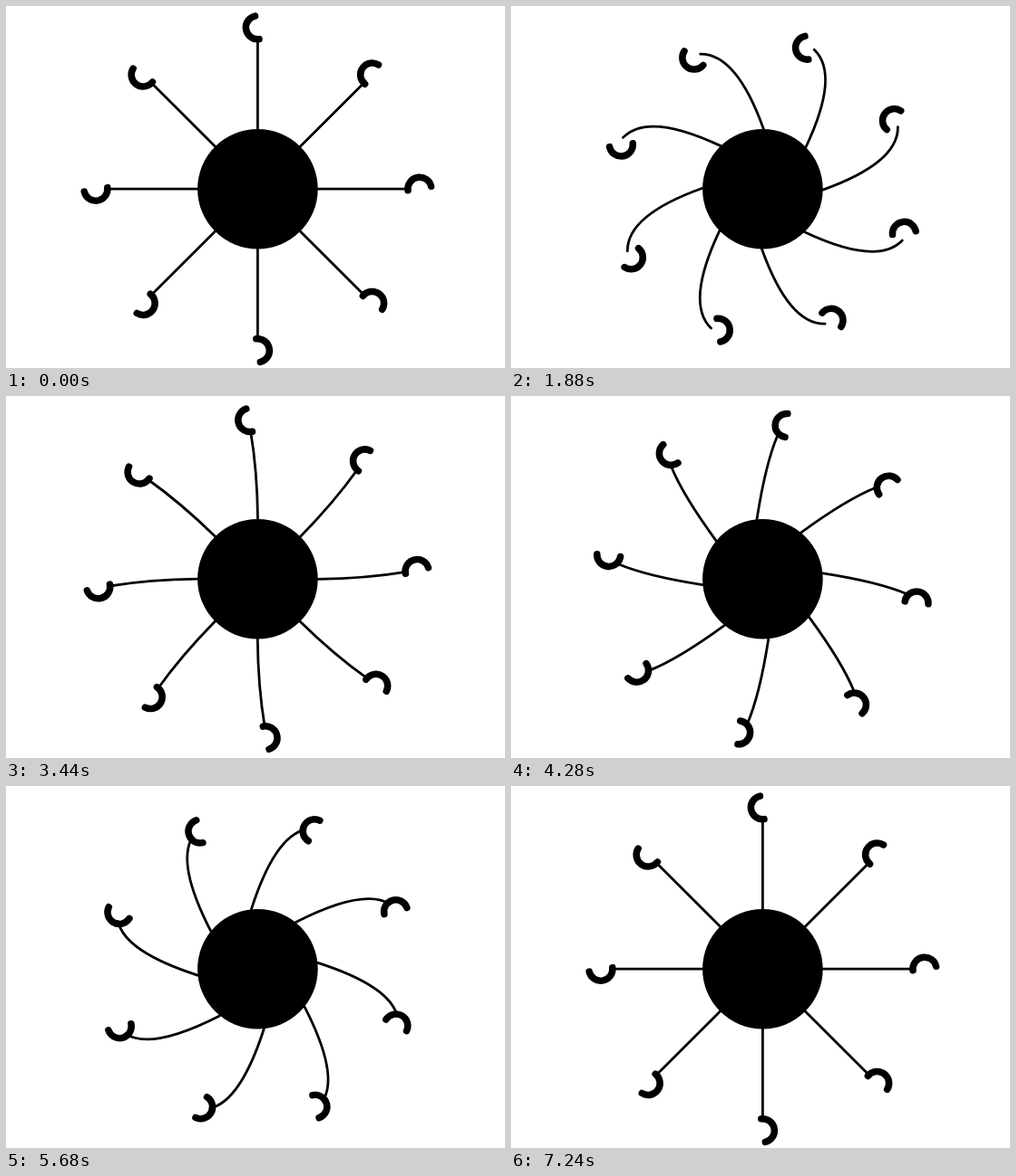
Animation of 550x400 px, one loop 7280 ms. Source, as an HTML page with a canvas:

```html
<!DOCTYPE html>
<html>
<head>
<meta charset="utf-8">
<style>
  html, body { margin: 0; width: 100%; height: 100%; overflow: hidden; background: #fff; }
  canvas { display: block; }
</style>
</head>
<body>
<canvas id="stage" width="550" height="400"></canvas>
<script>
const ctx = document.getElementById('stage').getContext('2d');
const RAD = Math.PI / 180;
const STEP = 40, STEPS = 182, HALF = 91, ARMS = 8;
const CX = 277.4, CY = 202.2, DISC = 66.3;

// How the arms bend to each side: stem control point and tip, hook angle.
const LEFT = { side: -1, control: b => 31 * b * b, inset: b => 15.5 * b * b, swing: 28.5 };
const RIGHT = { side: 1, control: b => 31 * b, inset: b => 11 * b, swing: 26 };

// Bend of the arms at a step: 0 is straight, 1 is the furthest swing.
function bendAt(step) {
  if (step <= HALF) return 1 - Math.abs(step - 45.5) / 45.5;
  return step <= 136 ? (step - HALF + 0.5) / 45.5 : (181 - step) / 45;
}

function drawArm(bend, { side, control, inset, swing }, shift) {
  // Thin stem, curving from the disc to its tip
  ctx.lineWidth = 2.8;
  ctx.beginPath();
  ctx.moveTo(DISC, -side * bend - shift * 6);
  ctx.quadraticCurveTo(
    115 + 36 * bend, side * control(bend) - shift * 8,
    163.5 - inset(bend), side * 71 * bend - shift * 9
  );
  ctx.stroke();

  // Thick hook, swinging round the disc while it turns
  const reach = 178.5 - 15.3 * bend ** 0.8;
  const polar = side * swing * bend ** 1.05 * RAD;
  const turn = side * 45 * bend;
  ctx.lineWidth = 7.5;
  ctx.beginPath();
  ctx.arc(reach * Math.cos(polar), reach * Math.sin(polar), 13,
    (173 + turn) * RAD, (347 + turn) * RAD);
  ctx.stroke();
}

function draw(now) {
  const step = Math.floor(now / STEP) % STEPS;
  const bend = bendAt(step);
  const pose = step < HALF ? LEFT : RIGHT;
  const shift = step >= HALF && step < STEPS - 1 ? 1 : 0;

  ctx.setTransform(1, 0, 0, 1, 0, 0);
  ctx.fillStyle = '#fff';
  ctx.fillRect(0, 0, 550, 400);
  ctx.translate(CX, CY);
  ctx.strokeStyle = ctx.fillStyle = '#000';
  ctx.lineCap = 'round';
  for (let i = 0; i < ARMS; i++) {
    drawArm(bend, pose, shift);
    ctx.rotate(2 * Math.PI / ARMS);
  }
  ctx.beginPath();
  ctx.arc(0, 0, DISC, 0, 2 * Math.PI);
  ctx.fill();
}

const start = performance.now();
function loop() {
  draw(performance.now() - start);
  requestAnimationFrame(loop);
}
loop();
</script>
</body>
</html>
```
